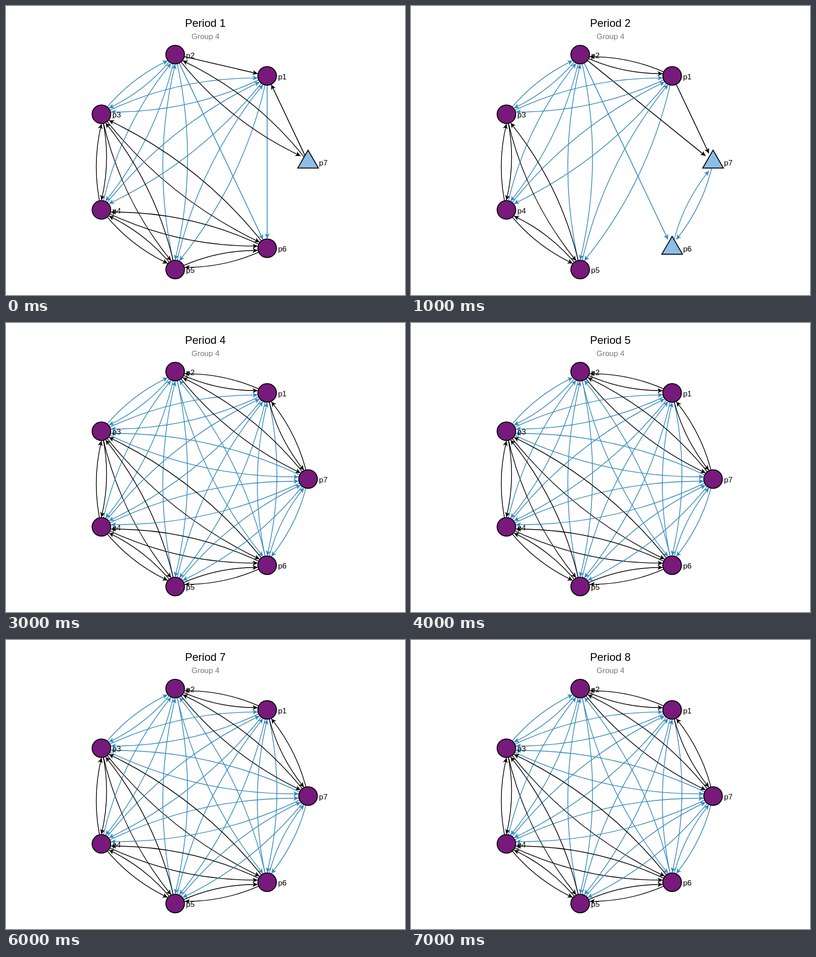
An HTML page for the animation above (8 s loop, 878x638 px).

```html
<!DOCTYPE html>
<html lang="en">
<head>
<meta charset="utf-8">
<title>Network by period</title>
<style>
  html, body { margin: 0; width: 100%; height: 100%; overflow: hidden; background: #fff; }
  svg { display: block; width: 878px; height: 638px; font: 17px "Liberation Sans", Arial, sans-serif; }
  .edge { fill: none; stroke-width: 1.6; }
  .node { stroke: #000; stroke-width: 2; }
</style>
</head>
<body>
<svg id="stage" viewBox="0 0 878 638">
  <text id="title" x="394" y="45.5" font-size="24"></text>
  <text x="439" y="73" fill="#777" text-anchor="middle">Group 4</text>
  <defs id="defs"></defs>
  <g id="edges"></g>
  <g id="nodes"></g>
  <g id="labels"></g>
</svg>
<script>
const STEP = 1000, STEPS = 8, COUNT = 7;
const RADIUS = 20.5, GAP = 21.5, BEND = 0.12;
const INK = { inner: '#000', cross: '#3288bd' };
const PURPLE = '#78197c', SKY = '#8dbee6';

// Links that are absent and nodes that are out, per period; later periods are complete.
const PERIODS = [
  { absent: '12 17 61 62 73 74 75 76 37 47 57 67', out: '7' },
  { absent: '71 72 62 16 61 63 64 65 36 46 56 73 74 75 37 47 57', out: '67' },
  { absent: '', out: '' }
];

const $ = id => document.getElementById(id);

function add(parent, tag, attrs) {
  const el = document.createElementNS('http://www.w3.org/2000/svg', tag);
  for (const key in attrs) el.setAttribute(key, attrs[key]);
  parent.appendChild(el);
  return el;
}

function place(id) {
  const a = id * 2 * Math.PI / COUNT;
  return { id, x: 425.5 + 239.2 * Math.cos(a), y: 344.5 - 243.4 * Math.sin(a) };
}

const nodes = Array.from({ length: COUNT }, (_, i) => place(i + 1));
const team = id => [1, 2, 7].includes(id);

// From the centre of one node to the rim of the other.
// Links along a falling diagonal bow to the opposite side of travel.
function edgePath(a, b, bend) {
  const k = 1 - GAP / Math.hypot(b.x - a.x, b.y - a.y);
  const dx = (b.x - a.x) * k, dy = (b.y - a.y) * k;
  const bow = dx * dy > 1 ? -bend : bend;
  const cx = a.x + dx / 2 + dy * bow, cy = a.y + dy / 2 - dx * bow;
  return `M${a.x},${a.y}Q${cx},${cy} ${a.x + dx},${a.y + dy}`;
}

function trianglePath({ x, y }) {
  const h = 13.15, w = h * Math.sqrt(3);
  return `M${x},${y - 2 * h}L${x + w},${y + h}H${x - w}Z`;
}

function circlePath({ x, y }) {
  const r = RADIUS;
  return `M${x - r},${y}a${r},${r} 0 1 1 ${2 * r},0a${r},${r} 0 1 1 ${-2 * r},0Z`;
}

for (const kind in INK) {
  const marker = add($('defs'), 'marker', {
    id: kind, orient: 'auto', markerUnits: 'userSpaceOnUse',
    markerWidth: 12, markerHeight: 12, refX: 11, refY: 6
  });
  add(marker, 'path', { d: 'M11,6L0,.5L3,6L0,11.5Z', fill: INK[kind] });
}

const edges = [];
for (const a of nodes) for (const b of nodes) {
  if (a === b) continue;
  const kind = team(a.id) === team(b.id) ? 'inner' : 'cross';
  const el = add($('edges'), 'path', {
    class: 'edge', stroke: INK[kind], 'marker-end': `url(#${kind})`
  });
  edges.push({ a, b, el });
}

for (const n of nodes) {
  n.el = add($('nodes'), 'path', { class: 'node' });
  add($('labels'), 'text', { x: n.x + 24, y: n.y + 7.5 }).textContent = 'p' + n.id;
}

function show(step) {
  const { absent, out } = PERIODS[Math.min(step, PERIODS.length - 1)];
  const gone = absent.split(' ');
  const has = (a, b) => !gone.includes(`${a.id}${b.id}`);
  $('title').textContent = 'Period ' + (step + 1);
  for (const { a, b, el } of edges) {
    const mutual = has(b, a);
    el.setAttribute('visibility', has(a, b) ? 'visible' : 'hidden');
    el.setAttribute('d', edgePath(a, b, mutual ? BEND : 0));
    el.style.strokeWidth = mutual ? '' : 1.8;
  }
  for (const n of nodes) {
    const isOut = out.includes(n.id);
    n.el.setAttribute('d', isOut ? trianglePath(n) : circlePath(n));
    n.el.setAttribute('fill', isOut ? SKY : PURPLE);
  }
}

let current = 0;
const start = performance.now();
show(current);

function tick() {
  const step = Math.floor((performance.now() - start) / STEP) % STEPS;
  if (step !== current) show(current = step);
  requestAnimationFrame(tick);
}
requestAnimationFrame(tick);
</script>
</body>
</html>
```
